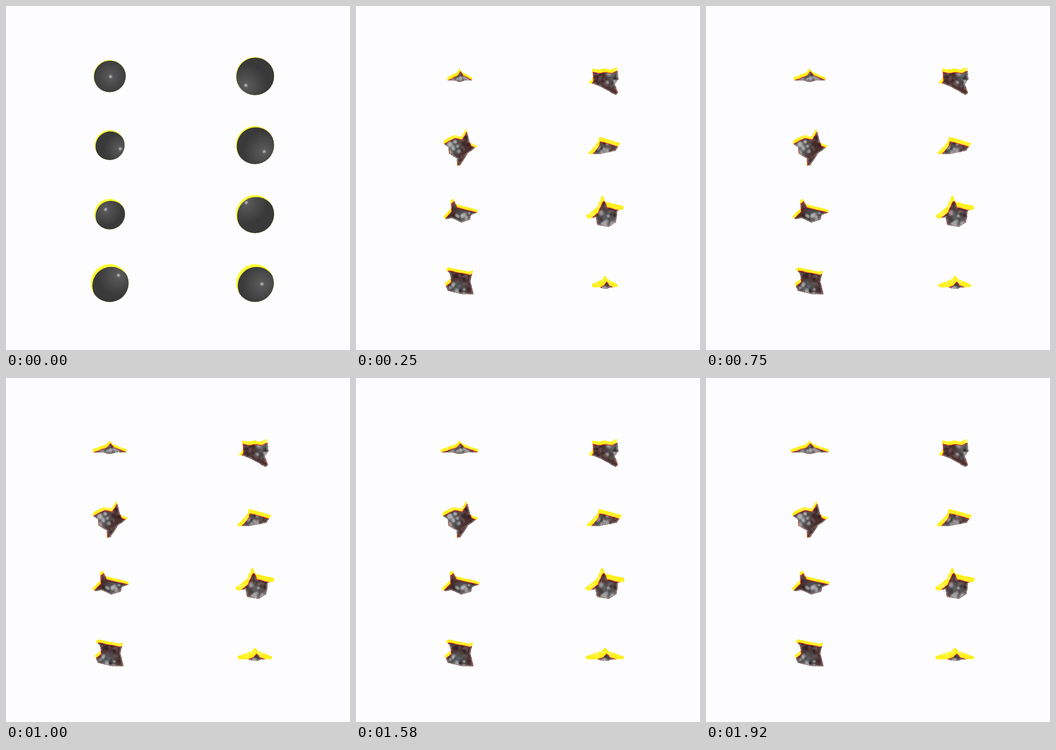
An HTML page with a canvas for the animation above (2010 ms loop, 748 px wide and 748 px high).

```html
<!DOCTYPE html>
<html>
<head>
<meta charset="utf-8">
<style>
  html, body { margin: 0; width: 100%; height: 100%; overflow: hidden; background: #fdfdff; }
  canvas { display: block; }
</style>
</head>
<body>
<canvas id="stage" width="748" height="748"></canvas>
<script>
const ctx = document.getElementById('stage').getContext('2d');
const LOOP = 2010;
const YELLOW = '#fff01c', RED = '#ee2c26', BROWN = '#4a2f2f';
// Twelve ticks per second; every sixth tick holds the previous picture.
const ticks = Array.from({ length: 24 }, (_, i) => Math.round(i * 100 / 12) * 10);

// Tips and valleys of each silhouette, relative to the centre of its grid cell.
const edgeOn = '-43 3,-8 -9,0 -17,7 -9,42 3,40 9,18 9,1 13,-18 9,-40 9';
// radius: starting ball, shine: its highlight, grey: middle of the pale texture,
// reach: how wide the silhouette is when it first settles.
const views = [
  { radius: 35, shine: [2, 1], grey: [0, 10], reach: 0.66, outline: edgeOn },
  { radius: 41.5, shine: [-20, 20], grey: [22, 4], reach: 1,
    outline: '-36 15,-26 2,-28 -17,-16 -14,0 -17,11 -14,26 -20,29 6,21 17,28 36,23 41,0 28,-23 17' },
  { radius: 32.5, shine: [23, 8], grey: [-16, 6], reach: 0.94,
    outline: '-25 18,-26 4,-38 -4,-36 -11,-13 -22,4 -19,15 -36,23 -6,41 2,18 18,2 43,-7 45,-6 29' },
  { radius: 41.5, shine: [20, 14], grey: [-10, 14], reach: 0.9,
    outline: '-42 19,-29 6,-17 -7,-14 -18,8 -13,37 -4,25 12,-10 19' },
  { radius: 33.3, shine: [-9, -10], grey: [10, 7], reach: 0.9,
    outline: '-40 6,-21 -13,-22 -30,-16 -34,-9 -22,43 -9,42 -3,28 1,24 12,4 18,-19 8,-31 11' },
  { radius: 41.5, shine: [-19, -25], grey: [4, 12], reach: 0.95,
    outline: '-44 4,-18 -16,-9 -38,-5 -40,1 -27,43 -17,41 -10,28 -8,25 17,8 28,-18 23,-21 6,-38 10' },
  { radius: 41.2, shine: [19, -17], grey: [-5, 13], reach: 1,
    outline: '-26 16,-33 1,-19 -10,-22 -22,-31 -30,-25 -34,20 -25,29 -28,23 -4,30 24,5 24' },
  { radius: 41, shine: [15, 2], grey: [4, 14], reach: 0.67, outline: edgeOn },
].map(view => ({ ...view, outline: view.outline.split(',').map(pair => pair.split(' ').map(Number)) }));

function seeded(seed) {
  return () => {
    const v = Math.sin(seed++ * 12.9898) * 43758.5453;
    return v - Math.floor(v);
  };
}

const lerp = (a, b, p) => a + (b - a) * p;
const mix = (a, b, p) => a.map((v, i) => lerp(v, b[i], p));

// "collapse" pulls the ball onto the outline; "stretch" sets the width of the outline.
function silhouette({ outline, radius }, collapse, stretch, seed) {
  const path = new Path2D();
  if (!collapse) {
    path.arc(0, 0, radius, 0, Math.PI * 2);
    return path;
  }
  const random = seeded(seed);
  outline.forEach((point, i) => {
    const next = outline[(i + 1) % outline.length];
    for (let k = 0; k < 5; k++) {
      const [x, y] = mix(point, next, k / 5).map(v => v + random() - 0.5);
      const angle = Math.atan2(y, x);
      const start = [radius * Math.cos(angle), radius * Math.sin(angle)];
      path.lineTo(...mix(start, [x * stretch, y], collapse));
    }
  });
  path.closePath();
  return path;
}

function blob(x, y, r, rgb, alpha) {
  const fade = ctx.createRadialGradient(x, y, r * 0.3, x, y, r);
  fade.addColorStop(0, `rgba(${rgb},${alpha})`);
  fade.addColorStop(1, `rgba(${rgb},0)`);
  ctx.fillStyle = fade;
  ctx.fillRect(x - r, y - r, 2 * r, 2 * r);
}

function scatter(count, [cx, cy], spread, random, draw) {
  for (let i = 0; i < count; i++) {
    draw(cx + (random() - 0.5) * spread, cy + (random() - 0.5) * spread);
  }
}

function shadeBall({ radius, shine }) {
  const fade = ctx.createRadialGradient(...shine, 0, ...shine, radius * 1.1);
  fade.addColorStop(0, '#5c5c5c');
  fade.addColorStop(1, '#393939');
  ctx.fillStyle = fade;
  ctx.fillRect(-50, -50, 100, 100);
  blob(...shine, 5, '190,190,190', 0.8);
}

function shadeStar({ grey }, whole, random) {
  ctx.fillStyle = BROWN;
  ctx.fillRect(-50, -50, 100, 100);
  blob(...grey, 27, '84,88,90', 1);
  scatter(150, [0, 0], 88, random, (x, y) => {
    const tone = random() < 0.5 ? '26,16,18' : '140,122,122';
    blob(x, y, 3 + random() * 4, tone, 0.32);
  });
  scatter(9, grey, 34, random, (x, y) => blob(x, y, 4 + random() * 4, '188,188,190', 0.65));
  // Pale lower edge with dark crumbs.
  ctx.strokeStyle = 'rgba(196,166,168,.5)';
  ctx.lineWidth = 5;
  ctx.stroke(whole);
  ctx.strokeStyle = 'rgba(15,15,18,.55)';
  ctx.lineWidth = 2;
  ctx.setLineDash([2, 4]);
  ctx.stroke(whole);
}

function drawView(view, index, frame) {
  const column = index % 2, row = index >> 1;
  const collapse = [0, 0.5, 0.82][frame] ?? 1;
  const settle = frame < 3 ? 0 : 1 - (1 - (frame - 3) / 16) ** 2;
  const random = seeded(index * 613 + 11);

  // The dark body is the silhouette moved down inside itself.
  const drop = lerp(1.2 + 1.5 * row, 8 + column * (1 + 2 * row), collapse);
  const shift = [drop * lerp(0.6, 0.25, collapse), drop];
  const whole = silhouette(view, collapse, lerp(view.reach, 1, settle), index * 97 + 5);
  const body = new Path2D();
  body.addPath(whole, new DOMMatrix().translate(...shift));

  ctx.save();
  ctx.translate(225.5 + 316 * column, 152.5 + 150 * row);
  ctx.fillStyle = collapse ? YELLOW : '#ffff32';
  ctx.fill(whole);
  ctx.clip(whole);
  if (collapse) {
    scatter(60, [0, -6], 88, random, (x, y) => blob(x, y, 3 + random() * 4, '255,250,110', 0.6));
    ctx.strokeStyle = RED;
    ctx.lineWidth = 3 * collapse;
    ctx.lineJoin = 'round';
    ctx.stroke(body);
  }
  ctx.clip(body);
  shadeBall(view);
  ctx.globalAlpha = collapse;
  if (collapse) shadeStar(view, whole, random);
  ctx.restore();
}

function render(time) {
  const tick = ticks.filter(start => start <= time).length - 1;
  const frame = tick - Math.floor((tick + 2) / 6);
  ctx.fillStyle = '#fdfdff';
  ctx.fillRect(0, 0, 748, 748);
  views.forEach((view, i) => drawView(view, i, frame));
}

const begin = performance.now();
function loop() {
  render((performance.now() - begin) % LOOP);
  requestAnimationFrame(loop);
}
loop();
</script>
</body>
</html>
```
